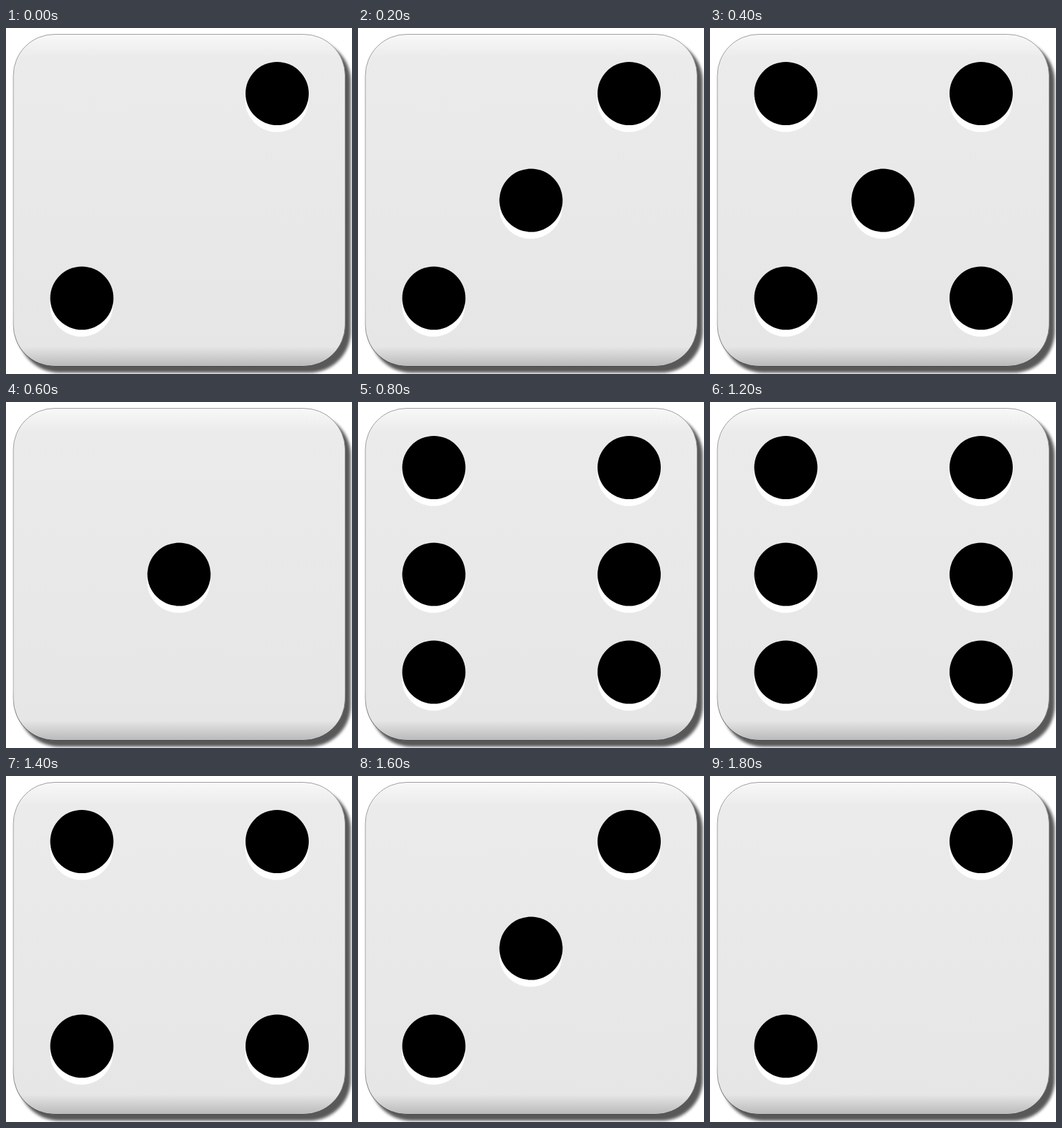
Write an HTML page that moves like this. It is 520x520 px and loops after 2 s.

```html
<!DOCTYPE html>
<html lang="en">
<head>
<meta charset="utf-8">
<title>Rolling die</title>
<style>
  html, body { margin: 0; width: 100%; height: 100%; overflow: hidden; background: #fff; }
  svg { display: block; width: 520px; height: 520px; }
</style>
</head>
<body>
<svg viewBox="0 0 520 520">
  <defs>
    <linearGradient id="face" x1="0" y1="0" x2="0" y2="1">
      <stop offset="0" stop-color="#f8f8f8"/>
      <stop offset=".07" stop-color="#ebebeb"/>
      <stop offset=".94" stop-color="#e6e6e6"/>
      <stop offset="1" stop-color="#b9b9b9"/>
    </linearGradient>
    <linearGradient id="rim" x1="0" y1="0" x2="0" y2="1">
      <stop offset="0" stop-color="#999"/>
      <stop offset=".85" stop-color="#aaa"/>
      <stop offset="1" stop-color="#444"/>
    </linearGradient>
    <filter id="soft" x="-5%" y="-5%" width="110%" height="110%">
      <feGaussianBlur stdDeviation="2"/>
    </filter>
  </defs>
  <rect x="18" y="18" width="500" height="500" rx="62" opacity=".65" filter="url(#soft)"/>
  <rect x="11" y="9.5" width="498.5" height="499" rx="62" fill="url(#face)" stroke="url(#rim)"/>
  <g id="pips"></g>
</svg>
<script>
const STEP = 200;
const ROLLS = '2351656432';
const COLUMNS = [114, 260, 407.5];
const ROWS = [98.5, 259, 406];
const RADIUS = 47.5;

// Whether a face shows a pip at column c, row r, each counted from -1 to 1.
function hasPip(value, c, r) {
  if (c === 0) return r === 0 && value % 2 === 1;
  if (r === 0) return value === 6;
  return value > (c === -r ? 1 : 3);
}

const circle = (x, y, fill) =>
  `<circle cx="${x}" cy="${y}" r="${RADIUS}" fill="${fill}"/>`;

function drawFace(value) {
  let markup = '';
  COLUMNS.forEach((x, i) => ROWS.forEach((y, j) => {
    if (hasPip(value, i - 1, j - 1)) {
      markup += circle(x - 0.5, y + 10.3, '#fff') + circle(x, y, '#000');
    }
  }));
  return markup;
}

const pips = document.getElementById('pips');
const start = performance.now();
let shown = 0;

function tick() {
  const step = Math.floor((performance.now() - start) / STEP);
  const value = Number(ROLLS[step % ROLLS.length]);
  if (value !== shown) {
    pips.innerHTML = drawFace(value);
    shown = value;
  }
  requestAnimationFrame(tick);
}
tick();
</script>
</body>
</html>
```
